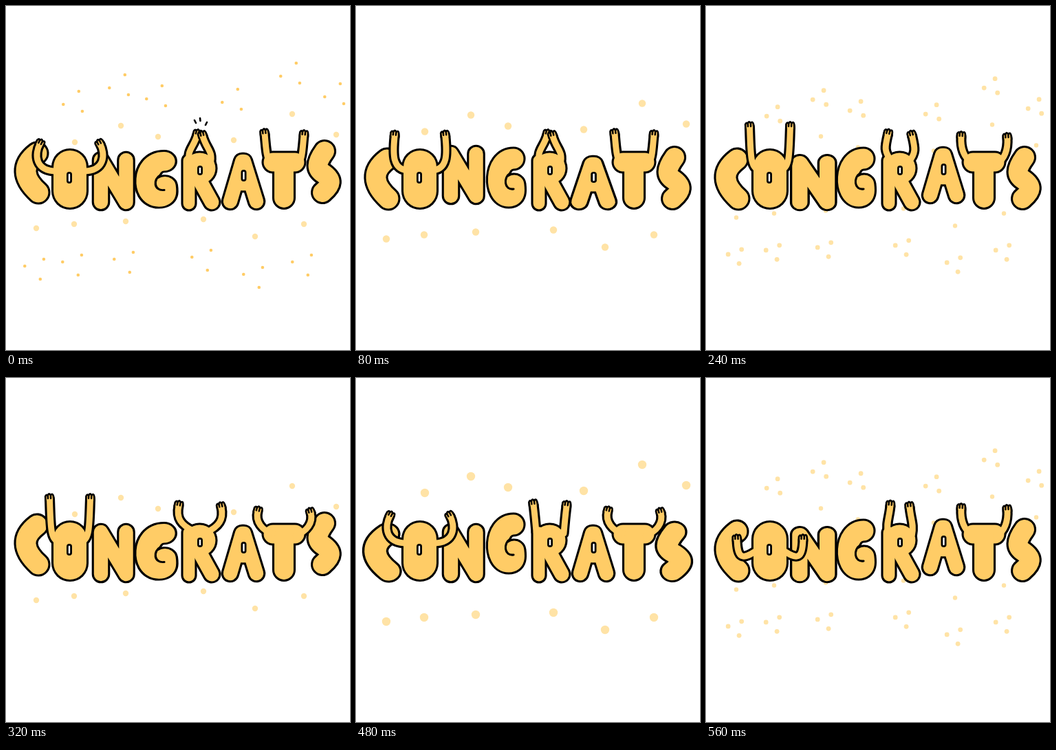
An HTML page with a canvas that plays this animation: 500 px wide and 500 px high, repeating every 0.64 s.

```html
<!DOCTYPE html>
<html lang="en">
<head>
<meta charset="utf-8">
<title>Congrats</title>
<style>
  html, body { margin: 0; width: 100%; height: 100%; overflow: hidden; background: #fff; }
  canvas { display: block; width: 100vw; height: 100vh; }
</style>
</head>
<body>
<canvas id="stage" role="img" aria-label="Congrats"></canvas>
<script>
const SIZE = 500, STEP = 80, STEPS = 8;
const GOLD = '#ffcc66', PALE = '#ffe3a6', INK = '#000', PAPER = '#fff';
const LINE = 3.1, BASELINE = 296, HOP = 9;

const canvas = document.getElementById('stage');
const ratio = Math.max(1, window.devicePixelRatio || 1);
canvas.width = canvas.height = SIZE * ratio;
const ctx = canvas.getContext('2d');
ctx.lineJoin = ctx.lineCap = 'round';

const shape = d => new Path2D(d);
const limb = (width, d) => ({ width, path: shape(d) });

// Each letter is a skeleton of fat round strokes; hoppers start one step after another.
const hoppers = [
  { center: 40, delay: 0, limbs: [limb(32, 'M45 223Q12 248 47 280')] },
  { center: 156, delay: 1, limbs: [limb(23.5, 'M138 285V224L174.5 285V224')] },
  { center: 219, delay: 2, limbs: [limb(32, 'M229 222C200 222 200 277 222 277C232 277 231 268 230 260')],
    hook: shape('M224 243C214 249 215 268 229 266') },
  { center: 345, delay: 3, limbs: [limb(23.5, 'M326 284L343 226H346L364 284M336 258H354')],
    slit: shape('M345.5 242V251') },
  { center: 462, delay: 0, limbs: [limb(31, 'M463 220C450 238 451 246 462 253C474 262 474 268 460 280')] }
];

// Left arm as a cubic from shoulder to wrist, keyed by step and tweened in between.
const oBent = [78, 240, 40, 242, 42, 214, 49, 201];
const oUp = [78, 238, 64, 237, 65, 215, 63.5, 176];
const oLow = [76, 249, 52, 266, 46, 262, 45, 235];
const rClap = [267, 228, 262, 209, 273, 206, 278, 187];
const rWide = [272, 222, 255, 214, 247, 204, 251, 186];
const rUp = [262, 224, 261, 212, 260, 200, 258, 184];
const tUp = [384, 228, 378, 220, 378, 205, 376, 186];
const tOut = [388, 226, 372, 222, 362, 208, 366, 194];

const dancers = [
  { axis: 282, drop: 2,
    limbs: [limb(20, 'M266 225V287'), limb(48, 'M281 236H282'), limb(24, 'M283 256L299 285')],
    slit: shape('M282 236V242'),
    keys: [[0, rClap], [2, rClap], [4, rWide], [6, rUp], [8, rClap]] },
  { axis: 404.5, drop: 2,
    limbs: [limb(30, 'M388 227H420'), limb(31, 'M404 230V279')],
    keys: [[0, tUp], [2, tUp], [4, tOut], [6, tOut], [8, tUp]] },
  { axis: 93, drop: 0,
    limbs: [limb(51, 'M93 234V269')],
    slit: shape('M92 245V254'),
    keys: [[0, oBent], [2, oUp], [4, oUp], [6, oBent], [7, oLow]] }
];

const hand = shape('M-6 2L-6.2 -4Q-4.6 -8 -2.6 -5Q-.8 -10 1.6 -5.5Q4.6 -9 5.6 -4L6 2');
const fingerGaps = shape('M-2.5 -5V-1M1.6 -5V-1');
const clapMarks = shape('M274 166L276 170M282 163L282.5 167M292 169L290 173');

const rockets = [
  [100, 198], [167, 174], [221, 190], [331, 195], [416, 157], [480, 187],
  [44, 323], [99, 317], [174, 313], [287, 310], [362, 335], [433, 317]
];

function dot(x, y, radius, color) {
  ctx.fillStyle = color;
  ctx.beginPath();
  ctx.arc(x, y, radius, 0, Math.PI * 2);
  ctx.fill();
}

function line(path, width, color = INK) {
  ctx.strokeStyle = color;
  ctx.lineWidth = width;
  ctx.stroke(path);
}

// Three crumbs around a point, mirrored for rockets that fly upwards.
function burst(x, y, dir, spread, radius, color) {
  for (let k = 0; k < 3; k++) {
    const angle = dir * (70 + 120 * k) * Math.PI / 180;
    dot(x + spread * Math.cos(angle), y + spread * Math.sin(angle), radius, color);
  }
}

function drawConfetti(step) {
  const stage = (step + 1) % 4;
  for (const [x, y] of rockets) {
    const dir = y < SIZE / 2 ? -1 : 1;
    const apex = y + dir * 31;
    dot(x, y + dir * 15.5 * (stage - 1), 3.2 + stage, PALE);
    if (stage === 0) burst(x, apex + dir * 9, dir, 12, 3.4, PALE);
    if (step === 0) burst(x, apex + dir * 27, dir, 17, 2.3, GOLD);
  }
}

function drawLimbs(limbs, grow, color) {
  limbs.forEach(({ path, width }) => line(path, width + grow, color));
}

function drawInside({ slit, hook }) {
  if (slit) {
    line(slit, 8);
    line(slit, 2.4, PAPER);
  }
  if (hook) line(hook, LINE);
}

function drawHopper(letter, step) {
  const phase = (step - letter.delay + STEPS) % 4;
  ctx.save();
  if (phase === 0) ctx.translate(0, -HOP);
  if (phase === 2) {
    ctx.translate(letter.center, BASELINE);
    ctx.scale(1.09, 0.95);
    ctx.translate(-letter.center, -BASELINE);
  }
  drawLimbs(letter.limbs, LINE, INK);
  drawLimbs(letter.limbs, -LINE, GOLD);
  drawInside(letter);
  ctx.restore();
}

function armsAt({ keys, axis, drop }, step) {
  const i = keys.findLastIndex(([at]) => at <= step);
  const [from, a] = keys[i];
  const [to, b] = keys[i + 1] || [from + 1, a];
  const t = (step - from) / (to - from);
  const left = a.map((v, n) => v + (b[n] - v) * t);
  const right = left.map((v, n) => n % 2 ? v + drop : 2 * axis - v);
  return [left, right];
}

function armPath([x, y, ...rest]) {
  const path = new Path2D();
  path.moveTo(x, y);
  path.bezierCurveTo(...rest);
  return path;
}

function drawHand(curve) {
  const [cx, cy, x, y] = curve.slice(4);
  ctx.save();
  ctx.translate(x, y);
  ctx.rotate(Math.atan2(x - cx, cy - y));
  ctx.fillStyle = GOLD;
  ctx.fill(hand);
  line(hand, 2.7);
  line(fingerGaps, 2.5);
  ctx.restore();
}

function drawDancer(letter, step) {
  const arms = armsAt(letter, step);
  const parts = [...letter.limbs, ...arms.map(curve => ({ width: 12, path: armPath(curve) }))];
  drawLimbs(parts, LINE, INK);
  drawLimbs(parts, -LINE, GOLD);
  arms.forEach(drawHand);
  drawInside(letter);
}

function draw(step) {
  ctx.setTransform(ratio, 0, 0, ratio, 0, 0);
  ctx.fillStyle = PAPER;
  ctx.fillRect(0, 0, SIZE, SIZE);
  drawConfetti(step);
  hoppers.forEach(letter => drawHopper(letter, step));
  dancers.forEach(letter => drawDancer(letter, step));
  if (step === 0) line(clapMarks, 2.6);
}

const start = performance.now();
function tick() {
  const elapsed = performance.now() - start;
  draw(Math.floor(elapsed / STEP) % STEPS);
  requestAnimationFrame(tick);
}
tick();
</script>
</body>
</html>
```
